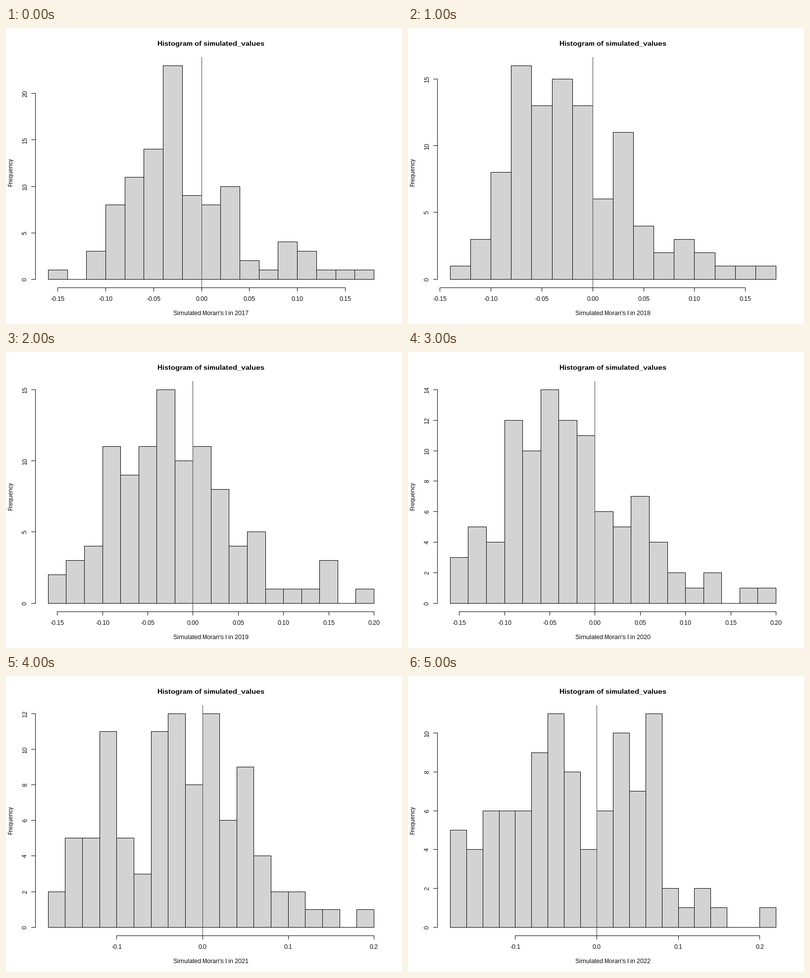
A matplotlib script for the animation above (6000 ms loop, 800 by 600 pixels).

```python
import math

import matplotlib.pyplot as plt
from matplotlib.animation import FuncAnimation
from matplotlib.patches import Rectangle

plt.rcParams.update({
    "font.family": "Liberation Sans",
    "text.hinting": "default",
    "text.hinting_factor": 1,
    "toolbar": "None",
})

W, H, DPI = 800, 600, 100
LEFT, RIGHT = 85.36, 743.44      # data span across
BASE, TOP = 509.24, 76.36        # zero line and tallest bar
AXIS_X, AXIS_Y = 59, 526
MID_X, MID_Y = 414.4, 292.8
BIN = 2                          # bin width in hundredths
FILL, RULE = "#d3d3d3", "#404040"

# first bin edge (hundredths), counts, x ticks (hundredths), y tick step
YEARS = [
    (-16, [1, 0, 3, 8, 11, 14, 23, 9, 8, 10, 2, 1, 4, 3, 1, 1, 1],
     range(-15, 16, 5), 5),
    (-14, [1, 3, 8, 16, 13, 15, 13, 6, 11, 4, 2, 3, 2, 1, 1, 1],
     range(-15, 16, 5), 5),
    (-16, [2, 3, 4, 11, 9, 11, 15, 10, 11, 8, 4, 5, 1, 1, 1, 3, 0, 1],
     range(-15, 21, 5), 5),
    (-16, [3, 5, 4, 12, 10, 14, 12, 11, 6, 5, 7, 4, 2, 1, 2, 0, 1, 1],
     range(-15, 21, 5), 2),
    (-18, [2, 5, 5, 11, 5, 3, 11, 12, 8, 12, 6, 9, 4, 2, 2, 1, 1, 0, 1],
     range(-10, 21, 10), 2),
    (-18, [5, 4, 6, 6, 6, 9, 11, 8, 4, 6, 10, 7, 11, 2, 1, 2, 1, 0, 0, 1],
     range(-10, 21, 10), 2),
]

fig = plt.figure(figsize=(W / DPI, H / DPI), dpi=DPI, facecolor="white")
ax = fig.add_axes([0, 0, 1, 1])


def block(x0, y0, x1, y1, color="black"):
    """Fill the pixels from (x0, y0) to (x1, y1), both included."""
    ax.add_patch(Rectangle((x0, y0), x1 - x0 + 1, y1 - y0 + 1,
                           facecolor=color, linewidth=0, antialiased=False))


def label(x, y, text, px=12, **style):
    ax.text(x, y, text, fontsize=px * 72 / DPI, color="black", ha="center",
            va="baseline", rotation_mode="anchor", **style)


def draw(i):
    start, counts, xticks, ystep = YEARS[i]
    peak = max(counts)

    def px(v):
        return LEFT + (RIGHT - LEFT) * (v - start) / (BIN * len(counts))

    def py(n):
        return BASE - (BASE - TOP) * n / peak

    ax.clear()
    ax.set(xlim=(0, W), ylim=(H, 0))
    ax.axis("off")

    # bars
    bottom = math.floor(BASE)
    for k, n in enumerate(counts):
        x0 = math.floor(px(start + BIN * k))
        x1 = math.floor(px(start + BIN * (k + 1)))
        y = math.floor(py(n))
        block(x0, y, x1, bottom)
        if n:
            block(x0 + 1, y + 1, x1 - 1, bottom - 1, FILL)

    # horizontal axis
    block(math.floor(px(xticks[0])), AXIS_Y, math.floor(px(xticks[-1])), AXIS_Y)
    digits = 2 if xticks.step == 5 else 1
    for v in xticks:
        x = math.floor(px(v))
        block(x, AXIS_Y, x, AXIS_Y + 7)
        label(px(v), 553, f"{v / 100:.{digits}f}")

    # vertical axis
    yticks = range(0, peak + 1, ystep)
    block(AXIS_X, math.floor(py(yticks[-1])), AXIS_X, bottom)
    for n in yticks:
        y = math.floor(py(n))
        block(AXIS_X - 8, y, AXIS_X, y)
        label(42, py(n), str(n), rotation=90)

    # zero marker
    zero = math.floor(px(0))
    block(zero, 59, zero, AXIS_Y - 1, RULE)

    label(MID_X, 36, "Histogram of simulated_values", 14, fontweight="bold")
    label(MID_X, 582, f"Simulated Moran's I in {2017 + i}")
    label(13, MID_Y, "Frequency", rotation=90)
    return []


anim = FuncAnimation(fig, draw, frames=len(YEARS), interval=1000,
                     repeat=True, repeat_delay=0, blit=False)
plt.show()
```
